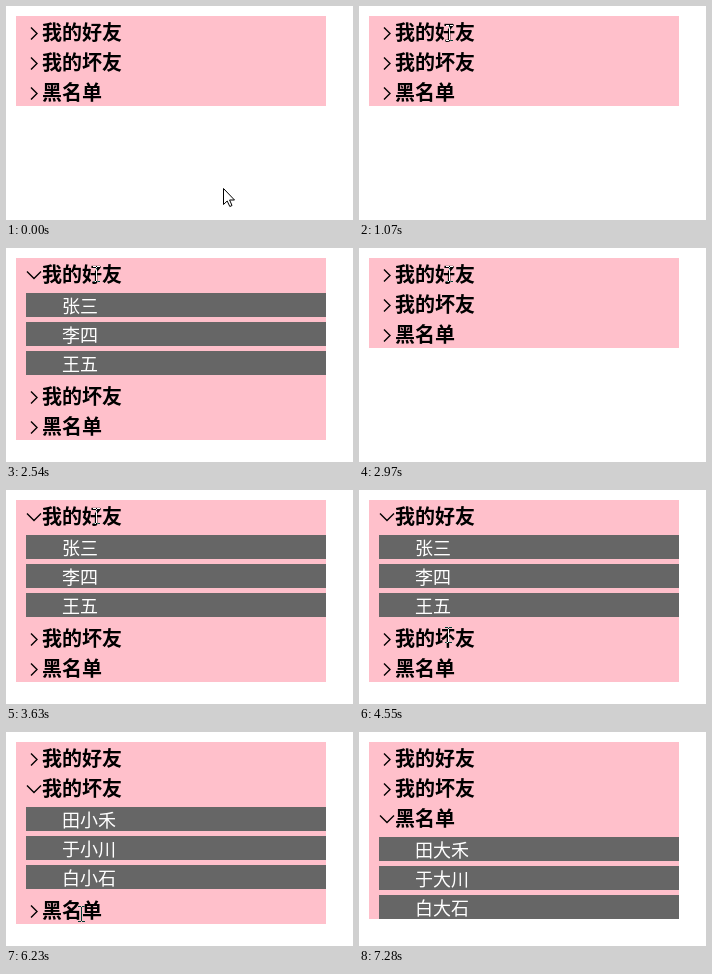
Animation of 347 by 214 pixels, one loop 7.71 s. Source, as an HTML page:

```html
<!DOCTYPE html>
<html lang="zh-CN">
<head>
<meta charset="utf-8">
<title>好友列表</title>
<style>
  html, body { margin: 0; width: 100%; height: 100%; overflow: hidden; background: #fff; }
  svg { display: block; width: 100vw; height: 100vh; }
  text { font-family: "Noto Sans CJK SC", "Noto Sans CJK JP", "Noto Sans CJK", sans-serif; }
  .head { font-size: 20px; font-weight: 700; }
  .item { font-size: 18px; fill: #fff; }
  .mark { fill: none; stroke: #000; stroke-width: 1.4; }
  #beam { fill: #fff; mix-blend-mode: difference; }
</style>
</head>
<body>
<svg id="stage" viewBox="0 0 347 214">
  <rect width="347" height="214" fill="#fff"/>
  <rect id="panel" x="10" y="10" width="310" fill="#ffc0cb"/>
  <g id="list"></g>
  <path id="arrow" d="M.5 .5V16.5L4.2 13L6.8 18.5L9 17.5L6.6 12H11.5Z" fill="#fff" stroke="#000"/>
  <path id="beam" shape-rendering="crispEdges"
    d="M0 0H3V1H0ZM4 0H7V1H4ZM3 1H4V15H3ZM0 15H3V16H0ZM4 15H7V16H4Z"/>
</svg>
<script>
const LOOP = 7710;
const ROW = 30, BAR = 24, GAP = 5;

const groups = [
  { name: '我的好友', items: ['张三', '李四', '王五'] },
  { name: '我的坏友', items: ['田小禾', '于小川', '白小石'] },
  { name: '黑名单', items: ['田大禾', '于大川', '白大石'] }
];

// [start time, open group]
const opens = [[0, -1], [1470, 0], [2970, -1], [3630, 0], [5130, 1], [6540, 2]];

// [start time, pointer shape, x, y]
const pointer = [
  [0, 'arrow', 217, 182], [530, 'arrow', 142, 90], [680, 'arrow', 96, 35],
  [830, 'beam', 89, 23], [950, 'beam', 88, 20], [1070, 'beam', 87, 19],
  [2120, 'arrow', 92, 45], [2240, 'arrow', 93, 62], [2390, 'arrow', 90, 42],
  [2540, 'beam', 87, 18], [4030, 'arrow', 95, 75], [4150, 'arrow', 91, 118],
  [4300, 'beam', 88, 132], [4430, 'beam', 87, 135], [4550, 'beam', 86, 137],
  [5810, 'beam', 84, 145], [5930, 'arrow', 81, 162], [6080, 'beam', 72, 173],
  [6230, 'beam', 72, 174], [7130, 'beam', 90, 180], [7280, 'none', 0, 0]
];

const byId = id => document.getElementById(id);

function add(parent, tag, attrs, text = '') {
  const node = document.createElementNS('http://www.w3.org/2000/svg', tag);
  for (const key in attrs) node.setAttribute(key, attrs[key]);
  node.textContent = text;
  return parent.appendChild(node);
}

const moveTo = (node, x, y) => node.setAttribute('transform', `translate(${x} ${y})`);
const show = (node, on) => node.setAttribute('display', on ? 'inline' : 'none');
const at = (steps, t) => steps.filter(step => step[0] <= t).pop();

for (const group of groups) {
  group.node = add(byId('list'), 'g', {});
  group.mark = add(group.node, 'path', { class: 'mark' });
  add(group.node, 'text', { class: 'head', x: 36, y: 24 }, group.name);
  group.body = add(group.node, 'g', {});
  group.items.forEach((name, i) => {
    const y = ROW + GAP + i * (BAR + GAP);
    add(group.body, 'rect', { x: 20, y, width: 300, height: BAR, fill: '#666' });
    add(group.body, 'text', { class: 'item', x: 56, y: y + 19.5 }, name);
  });
}

function render(t) {
  const open = at(opens, t)[1];
  let y = 10, bottom = 10;
  groups.forEach((group, i) => {
    const isOpen = i === open;
    moveTo(group.node, 0, y);
    group.mark.setAttribute('d', isOpen ? 'M21 13.5L28 20.5L35 13.5' : 'M25 11.5L31 17.5L25 23.5');
    show(group.body, isOpen);
    bottom = y += ROW;
    if (isOpen) {
      bottom = y + group.items.length * (BAR + GAP);
      y = bottom + GAP;
    }
  });
  byId('panel').setAttribute('height', bottom - 10);

  const [, shape, px, py] = at(pointer, t);
  for (const id of ['arrow', 'beam']) {
    show(byId(id), id === shape);
    moveTo(byId(id), px, py);
  }
}

const start = performance.now();
function tick() {
  render((performance.now() - start) % LOOP);
  requestAnimationFrame(tick);
}
tick();
</script>
</body>
</html>
```
